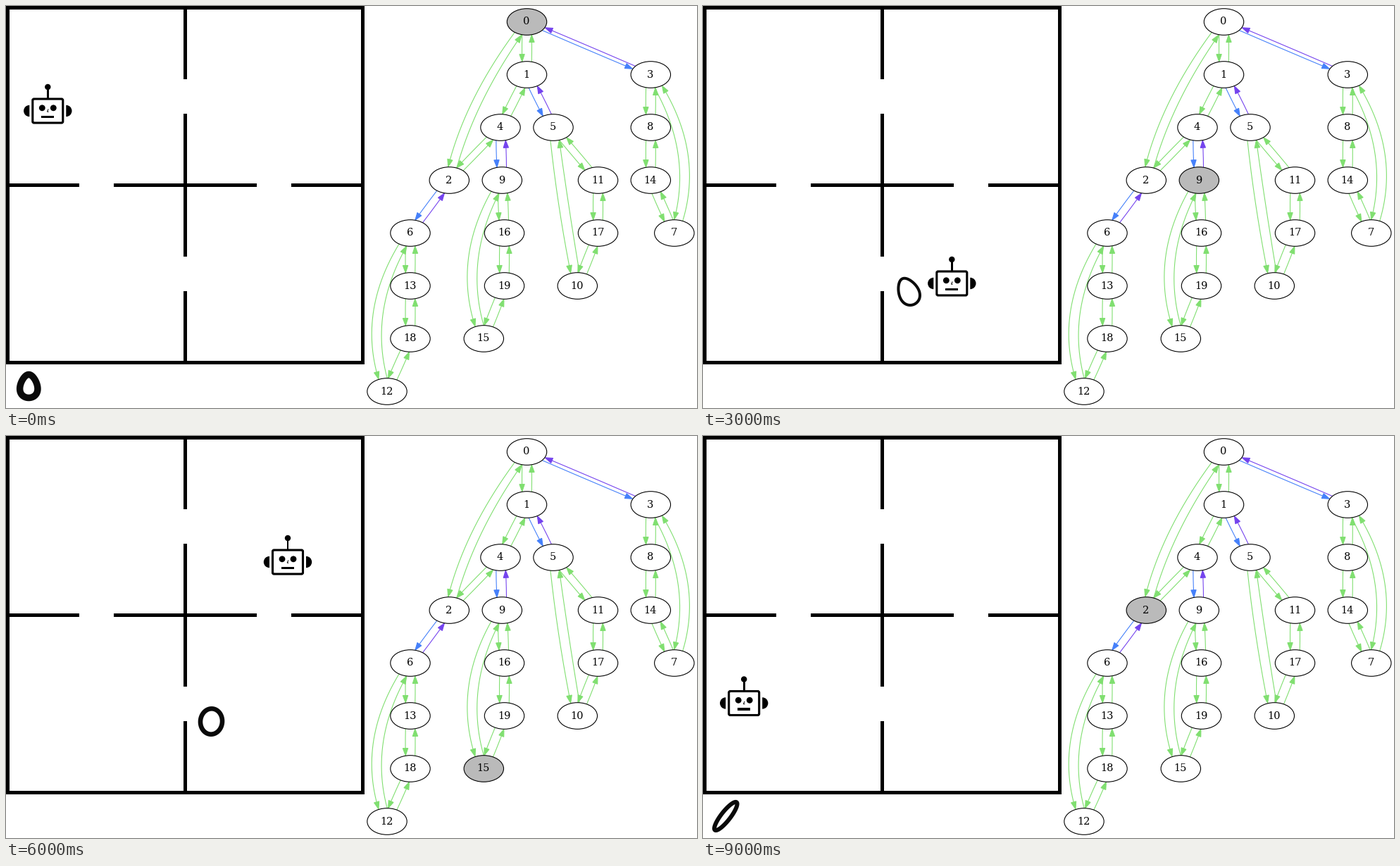
Write a matplotlib script that moves like this. It is 981 px wide and 571 px high and loops after 10 s.

```python
import numpy as np
import matplotlib.pyplot as plt
from matplotlib.animation import FuncAnimation
from matplotlib.patches import (Circle, Ellipse, FancyBboxPatch, Polygon,
                                Rectangle, Wedge)
from matplotlib.transforms import Affine2D

W, H, DPI = 981, 571, 100
PX = 72 / DPI  # points per pixel
GREEN, BLUE, PURPLE, GRAY = "#80df70", "#4580fa", "#7443ee", "#bababa"

fig = plt.figure(figsize=(W / DPI, H / DPI), dpi=DPI, facecolor="white")
ax = fig.add_axes([0, 0, 1, 1])
ax.set_xlim(0, W)
ax.set_ylim(H, 0)
ax.axis("off")

# Rooms: a square split in four, with one doorway per inner wall
SIDE, THICK = 509, 4.8


def wall(x, y, w, h):
    ax.add_patch(Rectangle((x, y), w, h, fc="black", lw=0))


for at in (0, SIDE - THICK):
    wall(0, at, SIDE, THICK)
    wall(at, 0, THICK, SIDE)
mid = (SIDE - THICK) / 2
for start, end in [(0, 104), (153, 356), (405, SIDE)]:
    wall(mid, start, THICK, end - start)
    wall(start, mid, end - start, THICK)

# State graph: x of every node, one row per rank
RANKS = [
    {0: 739.5},
    {1: 739.5, 3: 915.3},
    {4: 702, 5: 777, 8: 915.3},
    {2: 629.3, 9: 704.3, 11: 840.5, 14: 915.3},
    {6: 574, 16: 707.5, 17: 840.5, 7: 948.8},
    {13: 574, 19: 707.5, 10: 811.3},
    {18: 574, 15: 678.3},
    {12: 541},
]
NODES = {k: np.array([x, 22.5 + 75 * r])
         for r, row in enumerate(RANKS) for k, x in row.items()}
RX, RY = 28.2, 18.8
LANE = 6  # sideways shift that separates the two directions

# Parent to child; a bow pushes the middle of a long edge sideways
LINKS = [(0, 1), (1, 4), (2, 4), (6, 13), (13, 18), (12, 18), (9, 16), (16, 19),
         (15, 19), (5, 11), (11, 17), (10, 17), (3, 8), (8, 14), (7, 14)]
DOORS = [(0, 3), (1, 5), (4, 9), (2, 6)]
LONG = {(0, 2): -15, (6, 12): -29, (9, 15): -28, (5, 10): -2, (3, 7): 29}


def arrow(a, b, color, bow):
    """Bezier from node a to node b, cut off at both ellipses."""
    side = LANE if NODES[b][1] < NODES[a][1] else -LANE
    p, q = NODES[a] + (side, 0), NODES[b] + (side, 0)
    push = np.array([4 / 3 * (bow + side / 6), 0])
    t = np.linspace(0, 1, 400)[:, None]
    s = 1 - t
    c1, c2 = p + (q - p) / 3 + push, q - (q - p) / 3 + push
    curve = s**3 * p + 3 * s * s * t * c1 + 3 * s * t * t * c2 + t**3 * q
    outside = [np.hypot(*((curve - NODES[k]) / (RX, RY)).T) > 1 for k in (a, b)]
    curve = curve[outside[0] & outside[1]]
    tip = curve[-1]
    stem = curve[np.hypot(*(curve - tip).T) > 10.4]
    base = stem[-1]
    ax.plot(*stem.T, color=color, lw=1.1 * PX, zorder=2)
    n = np.array([base[1] - tip[1], tip[0] - base[0]]) * 0.35
    ax.add_patch(Polygon([tip, base + n, base - n], fc=color, ec=color,
                         lw=1.04 * PX, joinstyle="miter", zorder=2))


def pair(a, b, there=GREEN, back=GREEN, bow=0):
    arrow(a, b, there, bow)
    arrow(b, a, back, bow)


for a, b in LINKS:
    pair(a, b)
for a, b in DOORS:
    pair(a, b, BLUE, PURPLE)
for (a, b), bow in LONG.items():
    pair(a, b, bow=bow)

ovals = {}
for k, (x, y) in NODES.items():
    ovals[k] = ax.add_patch(Ellipse((x, y), 2 * RX, 2 * RY, fc="white",
                                    ec="black", lw=1.1 * PX, zorder=3))
    ax.text(x - 0.5, y + 4, str(k), family="DejaVu Serif", size=14.6 * PX,
            ha="center", va="baseline", zorder=4)

# Robot, drawn around the middle of its head
pose = Affine2D()


def part(patch):
    patch.set_transform(pose + ax.transData)
    patch.set_zorder(5)
    ax.add_artist(patch)


part(FancyBboxPatch((-21.5, -17), 43, 34, fc="none", ec="black",
                    boxstyle="round,pad=0,rounding_size=2", lw=3.1 * PX))
part(Rectangle((-1.3, -31), 2.6, 13, fc="black", lw=0))
part(Circle((0, -34), 4.2, fc="black", lw=0))
part(Rectangle((-9, 6.8), 18, 3.6, fc="black", lw=0))
part(Polygon([(0.8, -2.5), (-0.8, 1.2), (1.2, 1.2)], closed=False, fc="none",
             ec="black", lw=PX))
for s in (-1, 1):
    part(Circle((8 * s, -4.2), 4.4, fc="black", lw=0))
    part(Wedge((26 * s, 0), 8.2, -90 * s, 90 * s, fc="black", lw=0)
         if s > 0 else Wedge((-26, 0), 8.2, 90, 270, fc="black", lw=0))


def ring(rx, ry, tilt=0, taper=0):
    """Egg outline, narrow end up, turned clockwise by tilt degrees."""
    u = np.linspace(0, 2 * np.pi, 90, endpoint=False)
    x = rx * np.sin(u) * (1 - taper * np.cos(u))
    y = -ry * np.cos(u)
    a = np.radians(tilt)
    return np.column_stack([x * np.cos(a) - y * np.sin(a),
                            x * np.sin(a) + y * np.cos(a)])


zero = ax.add_patch(Polygon(ring(1, 1), fc="none", ec="#0a0a0a",
                            joinstyle="round", zorder=5))

HELD, PLACED = (32.3, 540), (291.5, 405.5)
# active node, robot position, place of the zero, its stroke and shape
STEPS = [
    (0, (59.3, 149), HELD, 9.5, ring(12.3, 16.5, 0, 0.25)),
    (1, (390, 122), HELD, 6, ring(12, 20, 15)),
    (4, (350.7, 337), HELD, 6, ring(11.5, 18.2, 15)),
    (9, (353.3, 394), PLACED, 4, ring(14, 20, -25, 0.2)),
    (16, (171.8, 426), PLACED, 7, ring(11.2, 20, 30, 0.15)),
    (19, (148.5, 130), PLACED, 6, ring(12, 20, 15)),
    (15, (400, 179), PLACED, 6.6, ring(15.5, 18.2, 5)),
    (9, (406.3, 416), PLACED, 4.3, ring(13, 20.5, -105, 0.2)),
    (4, (385, 380), HELD, 4.3, ring(13, 20.5, -105, 0.2)),
    (2, (58.2, 379.5), HELD, 6, ring(6.5, 25, 38)),
]


def update(i):
    active, at, spot, stroke, shape = STEPS[i]
    for k, oval in ovals.items():
        oval.set_facecolor(GRAY if k == active else "white")
    pose.clear().translate(*at)
    zero.set_xy(shape + spot)
    zero.set_linewidth(stroke * PX)
    return [zero]


anim = FuncAnimation(fig, update, frames=len(STEPS), interval=1000, repeat=True,
                     repeat_delay=0, blit=False)
plt.show()
```
